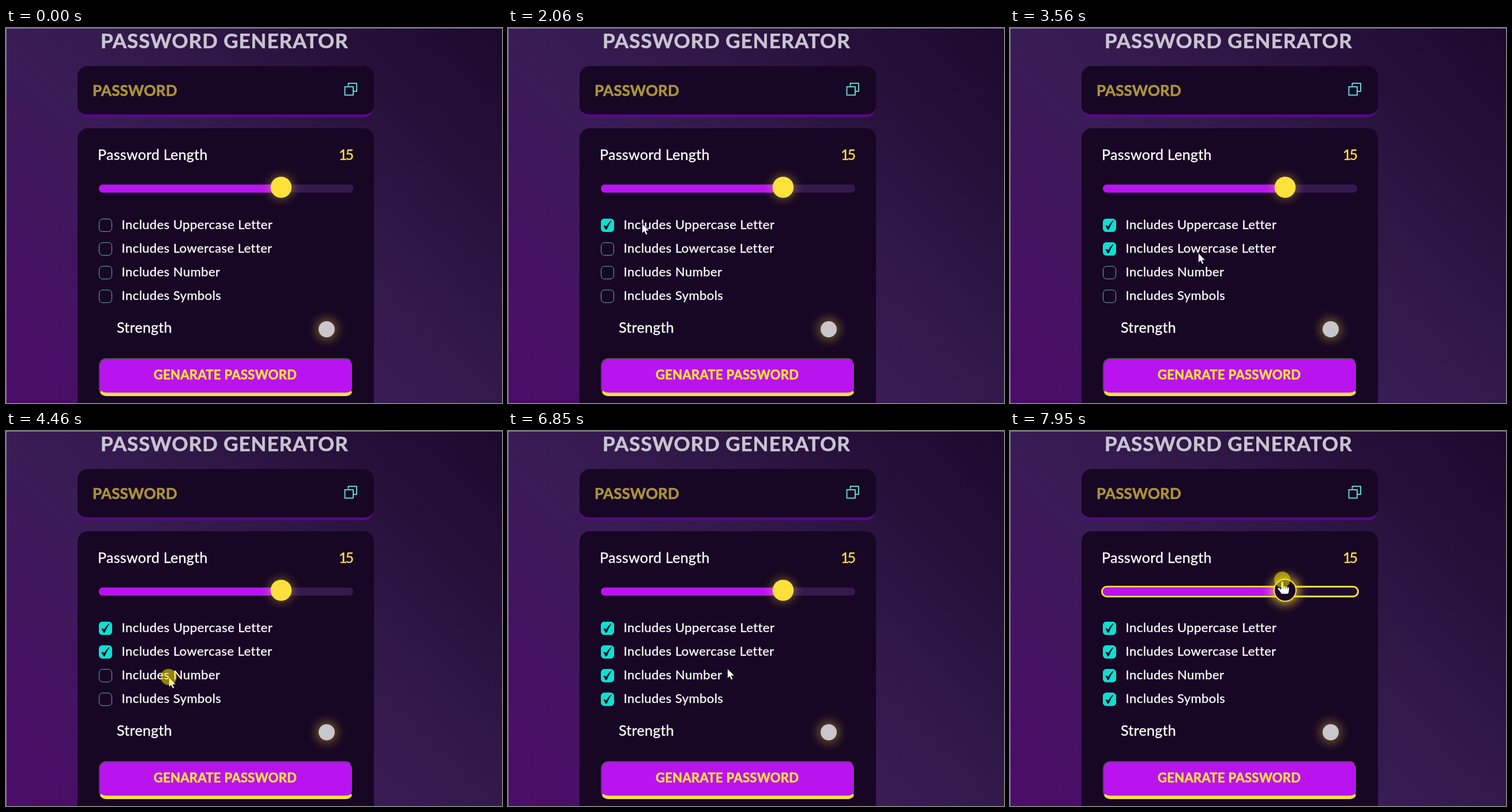
Write an HTML page that moves like this. It is 860 px wide and 651 px high and loops after 7.99 s.

```html
<!DOCTYPE html>
<html lang="en">
<head>
<meta charset="utf-8">
<title>Password generator</title>
<style>
  html, body { margin: 0; width: 100%; height: 100%; overflow: hidden; background: #2d1545; }
  svg { display: block; width: 860px; height: 651px; }
  text {
    font-family: Lato, "Open Sans", sans-serif; color: #fff; white-space: pre;
    fill: currentColor; stroke: currentColor; stroke-width: .35px;
  }
  .caps { font-weight: 700; stroke-width: .6px; }
  .label { font-size: 25px; letter-spacing: .3px; }
  .option { font-size: 22px; letter-spacing: .45px; }
  .yellow { color: #fee13a; }
  .field, .button { box-sizing: border-box; height: 100%; }
  .field { background: #170624; border-bottom: 5px solid #560a84; border-radius: 18px; }
  .button {
    background: #b913f0; border: 2px solid #4c4c4c; border-right-color: #000;
    border-bottom: 6px solid #fee13a; border-radius: 13px;
  }
</style>
</head>
<body>
<svg viewBox="0 0 860 651">
  <defs>
    <linearGradient id="page" gradientUnits="userSpaceOnUse" x1="0" y1="651" x2="755" y2="-104">
      <stop offset="0" stop-color="#4c0d6a"/>
      <stop offset=".1" stop-color="#490f66"/>
      <stop offset=".43" stop-color="#391c56"/>
      <stop offset=".58" stop-color="#32194a"/>
      <stop offset="1" stop-color="#1c092c"/>
    </linearGradient>
    <filter id="soft" x="-150%" y="-150%" width="400%" height="400%"><feGaussianBlur stdDeviation="8.500"/></filter>
  </defs>

  <rect width="860" height="651" fill="url(#page)"/>
  <path d="M0 .5H860M.5 0V651" stroke="#c9c4d2" stroke-opacity=".6"/>

  <text class="caps" x="164" y="35" font-size="35" letter-spacing=".95" style="color:#c9c4d0">PASSWORD GENERATOR</text>

  <foreignObject x="124" y="66" width="514" height="89"><div class="field"></div></foreignObject>
  <text class="caps" x="150" y="117.500" font-size="26" letter-spacing=".15" style="color:#ac9439">PASSWORD</text>
  <path d="M593.500 100.500V96H608V110H602.500M587.500 102H602V116.500H587.500Z" fill="none" stroke="#62d3cc" stroke-width="2" stroke-linejoin="round"/>

  <rect x="124" y="174" width="514" height="520" rx="18" fill="#170624"/>
  <text class="label" x="159" y="229">Password Length</text>
  <text class="yellow" x="577" y="229" font-size="25" letter-spacing="-3">15</text>

  <rect x="161" y="271.700" width="441" height="14" rx="6.500" fill="#35194e"/>
  <rect id="hoverTrack" x="159.500" y="270.200" width="444" height="17" rx="8.500" fill="#1d0a2e" stroke="#fee13a" stroke-width="3"/>
  <path d="M477 271.700H167.500a6.500 7 0 0 0 0 14H477Z" fill="#b913f0"/>
  <circle id="halo" cx="477" cy="276.500" fill="#fee13a" filter="url(#soft)"/>
  <circle cx="477" cy="276.500" r="18.300" fill="#fee13a"/>
  <circle id="hoverThumb" cx="477" cy="276.500" r="19" fill="#170624" stroke="#fee13a" stroke-width="2"/>

  <g id="options"></g>

  <text class="label" x="192" y="529">Strength</text>
  <circle cx="556" cy="523" r="19" fill="#fee13a" opacity=".36" filter="url(#soft)"/>
  <circle cx="556" cy="523" r="14" fill="#c9c6cc"/>

  <foreignObject x="161" y="573" width="441" height="66"><div class="button"></div></foreignObject>
  <text class="caps yellow" x="256" y="610" font-size="22" letter-spacing=".3">GENARATE PASSWORD</text>

  <g id="pointer">
    <path id="arrow" d="M.5 .5V17.500L4.300 14 7 20 9.800 18.800 7.200 13H12.500Z" fill="#fff" stroke="#170624" stroke-width=".8"/>
    <g id="hand" stroke="#170624" stroke-width=".8">
      <path d="M-2 5q0-2 2-2t2 2v6.500q2-1.300 3.500 .5 2-1 3.300 .8 2.700-.8 3.200 1.700v4.500q0 3-2 6H-1.500Q-4 20.500-7.500 16.500q-1.300-2.500 1-2.800 2 .3 4.500 3Z" fill="#fff"/>
      <path d="M2 11.500v4M5.500 12v3.500M8.800 13v3"/>
    </g>
    <circle id="press" r="14" fill="#fff000" opacity=".52"/>
  </g>
</svg>
<script>
const LOOP = 7990, STEP = 68, PRESS = 190;
const $ = id => document.getElementById(id);
const show = (el, on) => { el.style.display = on ? '' : 'none'; };

// Each move runs from the previous spot to (x, y).
// bow bulges the path sideways, loop bends it up and then down.
const entry = { x: 792, y: 669 };
const moves = [
  { from: 580, to: 1530, x: 232, y: 339, power: 1.6, bow: 60, loop: -19 },
  { from: 2320, to: 3090, x: 326, y: 390, power: 3, bow: 116, loop: 42 },
  { from: 3830, to: 4190, x: 282, y: 427 },
  { from: 4700, to: 5060, x: 261, y: 480 },
  { from: 5390, to: 5460, x: 263, y: 474 },
  { from: 5990, to: 6130, x: 268, y: 460 },
  { from: 6850, to: 7330, x: 474, y: 255, bow: 95 },
  { from: 7470, to: 7660, x: 472, y: 258 }
];
const hoverMove = moves[moves.length - 1];
const options = [
  { name: 'Uppercase Letter', press: 1870 },
  { name: 'Lowercase Letter', press: 3360 },
  { name: 'Number', press: 4460 },
  { name: 'Symbols', press: 6390 }
];
const presses = [...options.map(o => o.press), 7950];

$('options').innerHTML = options.map(({ name }, i) => `
  <g transform="translate(161 ${331 + 41.1 * i})">
    <rect x=".5" y=".5" width="22" height="22" rx="6" fill="none" stroke="#5fb5b8"/>
    <g class="tick">
      <rect width="23" height="23" rx="6" fill="#0ce0d0"/>
      <path d="M5 12.500Q7 10.500 9 14.500Q12.500 7.500 18 3.500Q13.500 10 10 18.500H8Q7 14.500 5 12.500Z" fill="#170624" stroke="#170624"/>
    </g>
    <text class="option" x="39.500" y="18">Includes ${name}</text>
  </g>`).join('');
const ticks = document.querySelectorAll('.tick');

// Fraction of a move done, advancing in whole steps
function progress(t, { from, to }) {
  if (t < from) return 0;
  const last = Math.round((to - from) / STEP);
  const step = Math.floor((t - from) / (to - from) * last + .35);
  return Math.min((step + 1) / (last + 1), 1);
}

function position(t, i) {
  const start = moves[i - 1] || entry;
  const { x, y, power = 2, bow = 0, loop = 0 } = moves[i];
  const e = 1 - (1 - progress(t, moves[i])) ** power;
  return [
    start.x + (x - start.x) * e + bow * Math.sin(Math.PI * e),
    start.y + (y - start.y) * e - loop * Math.sin(2 * Math.PI * e)
  ];
}

function draw(t) {
  const current = moves.filter(m => t >= m.from).length - 1;
  show($('pointer'), current >= 0);
  if (current >= 0) $('pointer').setAttribute('transform', `translate(${position(t, current)})`);

  const hover = progress(t, hoverMove);
  show($('arrow'), !hover);
  show($('hand'), hover);
  show($('press'), presses.some(p => t >= p && t < p + PRESS));
  ticks.forEach((tick, i) => show(tick, t >= options[i].press + PRESS));

  $('hoverTrack').setAttribute('opacity', hover);
  $('hoverThumb').setAttribute('opacity', hover);
  $('halo').setAttribute('r', 20 + 5 * hover);
  $('halo').setAttribute('opacity', .4 + .3 * hover);
}

const origin = performance.now();
function frame() {
  draw((performance.now() - origin) % LOOP);
  requestAnimationFrame(frame);
}
draw(0);
requestAnimationFrame(frame);
</script>
</body>
</html>
```
